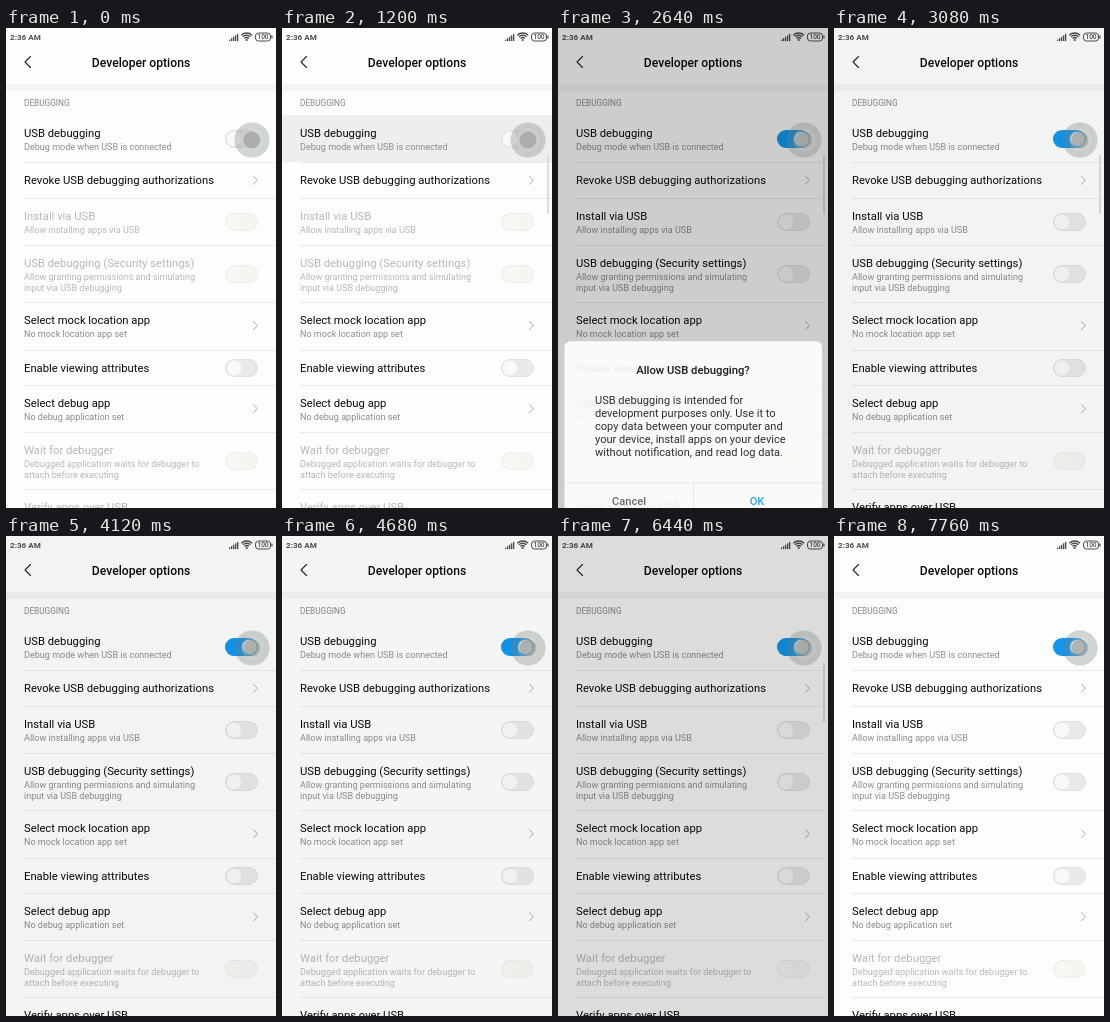
Recreate the animation shown at these times as an HTML page with a canvas. Size 270x480 px, loop 8.96 s.

```html
<!DOCTYPE html>
<html lang="en">
<head>
<meta charset="utf-8">
<title>Developer options</title>
<style>
  html, body { margin: 0; width: 100%; height: 100%; overflow: hidden; background: #fcfefb; }
  canvas { display: block; width: 270px; height: 480px; }
</style>
</head>
<body>
<canvas id="stage"></canvas>
<script>
const W = 270, H = 480, LOOP = 8960;
const canvas = document.getElementById('stage');
const scale = window.devicePixelRatio || 1;
canvas.width = W * scale;
canvas.height = H * scale;
const c = canvas.getContext('2d');

const PAGE = '#fcfefb', BLUE = '#0d98f2', INK = '#080a08';

const rows = [
  { y: 87, title: 'USB debugging', sub: ['Debug mode when USB is connected'], end: 'main' },
  { y: 134, title: 'Revoke USB debugging authorizations', end: 'chevron' },
  { y: 170, title: 'Install via USB', sub: ['Allow installing apps via USB'], end: 'toggle', needs: 'usb' },
  { y: 217, title: 'USB debugging (Security settings)',
    sub: ['Allow granting permissions and simulating', 'input via USB debugging'], end: 'toggle', needs: 'usb' },
  { y: 274, title: 'Select mock location app', sub: ['No mock location app set'], end: 'chevron' },
  { y: 321.5, title: 'Enable viewing attributes', end: 'toggle' },
  { y: 357, title: 'Select debug app', sub: ['No debug application set'], end: 'chevron' },
  { y: 404, title: 'Wait for debugger',
    sub: ['Debugged application waits for debugger to', 'attach before executing'], end: 'toggle', needs: 'app' },
  { y: 461, title: 'Verify apps over USB', needs: 'usb' }
];

const usbDialog = {
  top: 295, first: 353.5, step: 13, open: 1340, press: 2320, close: 2578, dim: 0.24,
  lines: ['USB debugging is intended for', 'development purposes only. Use it to',
    'copy data between your computer and', 'your device, install apps on your device',
    'without notification, and read log data.']
};
const keyDialog = {
  top: 303, first: 360.5, step: 12.8, open: 5420, press: 6120, close: 6240, dim: 0.3, check: 5840,
  lines: ["The computer's RSA key fingerprint is:", '99:D1:57:C7:31:4D:7D:5F:DC:', '6D:B4:EF:C6:48:F6:0F']
};

const clamp = x => Math.max(0, Math.min(1, x));
const span = (t, from, length) => clamp((t - from) / length);
const between = (t, a, b) => t >= a && t < b;

function text(s, x, y, size, color, weight = 400, align = 'left') {
  c.font = `${weight} ${size}px Roboto, sans-serif`;
  c.fillStyle = color;
  c.textAlign = align;
  c.textBaseline = 'alphabetic';
  c.fillText(s, x, y + size * 0.355);
}

function rect(x, y, w, h, color) {
  c.fillStyle = color;
  c.fillRect(x, y, w, h);
}

function pill(x, y, w, h, r) {
  c.beginPath();
  c.moveTo(x + r, y);
  c.arcTo(x + w, y, x + w, y + h, r);
  c.arcTo(x + w, y + h, x, y + h, r);
  c.arcTo(x, y + h, x, y, r);
  c.arcTo(x, y, x + w, y, r);
  c.closePath();
}

function disc(x, y, r, color) {
  c.beginPath();
  c.arc(x, y, r, 0, 7);
  c.fillStyle = color;
  c.fill();
}

function line(points, color, width) {
  c.beginPath();
  points.forEach(([x, y]) => c.lineTo(x, y));
  c.strokeStyle = color;
  c.lineWidth = width;
  c.lineCap = c.lineJoin = 'round';
  c.stroke();
}

function toggle(y, on, enabled) {
  c.save();
  if (!enabled) c.globalAlpha = 0.45;
  pill(219.5, y - 8.5, 32, 17, 8.5);
  c.fillStyle = '#e8eae7';
  c.fill();
  c.strokeStyle = '#dfe1de';
  c.lineWidth = 1;
  c.stroke();
  if (on > 0) {
    c.globalAlpha *= on;
    pill(219, y - 9, 33, 18, 9);
    c.fillStyle = BLUE;
    c.fill();
    c.globalAlpha = 1;
  }
  disc(228 + 15.5 * on, y, 7.3, '#f8faf7');
  c.restore();
}

function statusBar(color) {
  text('2:36 AM', 4, 9.3, 8.1, color, 700);
  for (let i = 0; i < 5; i++) rect(223 + i * 2, 11.5 - i * 1.4, 1.3, 1.6 + i * 1.4, color);
  c.strokeStyle = color;
  c.lineWidth = 1.4;
  c.lineCap = 'butt';
  for (const r of [3, 5.3, 7.6]) {
    c.beginPath();
    c.arc(240.7, 12.6, r, -Math.PI * 0.75, -Math.PI * 0.25);
    c.stroke();
  }
  disc(240.7, 12, 1.1, color);
  pill(249.5, 5, 15, 8, 3);
  c.lineWidth = 1;
  c.stroke();
  rect(265.3, 7.5, 1.2, 3, color);
  text('100', 257, 9.1, 6.6, color, 500, 'center');
}

function page(t) {
  const on = span(t, 2480, 110);
  const available = { usb: on > 0, app: false };
  rect(0, 0, W, H, PAGE);
  line([[24.5, 28.5], [19, 34], [24.5, 39.5]], '#222422', 1.1);
  text('Developer options', 135, 34.3, 12.15, INK, 500, 'center');
  rect(0, 56, W, 7, '#f3f5f2');
  text('DEBUGGING', 18, 75.5, 8.25, '#858784');
  if (t >= 1120 && t < 1400) rect(0, 87, W, 47, `rgba(0,0,0,${0.06 * span(t, 1080, 120)})`);

  for (const row of rows) {
    const enabled = !row.needs || available[row.needs];
    const lines = row.sub || [];
    if (row.y > 87) rect(18, Math.round(row.y), 252, 1, '#eaece9');
    text(row.title, 18, row.y + 18.3, 11.25, enabled ? INK : '#b7b9b6');
    lines.forEach((s, i) => text(s, 18, row.y + 31.7 + i * 10.7, 9.05, enabled ? '#8b8d8a' : '#b7b9b6'));
    const mid = row.y + (lines.length ? 18.5 + lines.length * 5.2 : 18.3);
    if (row.end === 'main') toggle(111, on, true);
    if (row.end === 'toggle') toggle(Math.round(mid), 0, enabled);
    if (row.end === 'chevron') line([[247.5, mid - 4], [251.3, mid], [247.5, mid + 4]], '#abadaa', 1);
  }
  if (between(t, 1120, 3480) || between(t, 5480, 7760)) rect(265, 127, 2, 59, '#dcdedb');
}

// Shade falls quickly once a dialog leaves; the first leaves a faint trace.
function shade(t) {
  const level = d => d.dim * (t < d.close
    ? Math.sqrt(span(t, d.open, 200))
    : Math.pow(1 - span(t, d.close, 760), 2.7));
  const trace = t > usbDialog.close ? 0.04 * (1 - span(t, 4480, 880)) : 0;
  return Math.max(level(usbDialog), level(keyDialog), trace);
}

function checkbox(x, y, on) {
  c.beginPath();
  c.arc(x, y, 7, 0, 7);
  c.strokeStyle = '#c6c8c5';
  c.lineWidth = 1;
  c.stroke();
  if (!on) return;
  c.save();
  c.globalAlpha *= on;
  disc(x, y, 7.6, BLUE);
  line([[x - 3.3, y + 0.2], [x - 0.9, y + 2.7], [x + 3.6, y - 2.5]], '#fff', 1.4);
  c.restore();
}

function dialog(d, t) {
  if (!between(t, d.open, d.close + 200)) return;
  const out = span(t, d.close, 200) ** 2;
  const rise = Math.pow(1 - span(t, d.open, 200), 4.3);
  const pressed = span(t, d.press - 40, 80) - span(t, d.press + 120, 80);
  c.save();
  c.translate(0, (H - d.top) * (rise + out));
  c.globalAlpha = 1 - out * 0.8;
  pill(6.5, d.top, 257.5, 473.5 - d.top, 6);
  c.fillStyle = '#fdfffc';
  c.fill();
  c.save();
  c.clip();
  rect(135.5, 436, 129, 38, `rgba(0,0,0,${0.06 * pressed})`);
  rect(6, 436, 259, 1, '#e3e5e2');
  rect(135, 436, 1, 38, '#e3e5e2');
  c.restore();
  text('Allow USB debugging?', 135, d.top + 29, 11.25, INK, 500, 'center');
  d.lines.forEach((s, i) => text(s, 37, d.first + i * d.step, 11.05, '#1b1d1b'));
  if (d.check) {
    checkbox(44, 414.3, span(t, d.check, 120));
    text('Always allow from this computer', 55, 414.8, 10.5, '#787a77');
  }
  text('Cancel', 71, 455.2, 11.1, '#5b5d5a', 500, 'center');
  text('OK', 199, 455.2, 11.1, '#1c9cea', 500, 'center');
  c.restore();
}

function floatingBall() {
  disc(246, 112, 17.6, 'rgba(120,124,120,0.32)');
  disc(246, 112, 11.3, 'rgba(255,255,255,0.12)');
  disc(246, 112, 8.6, 'rgba(140,143,140,0.5)');
}

function draw(t) {
  c.setTransform(scale, 0, 0, scale, 0, 0);
  const light = between(t, 5480, 6400);
  page(t);
  if (!light) statusBar('#4b4d4a');
  rect(0, 0, W, H, `rgba(0,0,0,${shade(t)})`);
  if (light) statusBar('#f6f8f5');
  floatingBall();
  dialog(usbDialog, t);
  dialog(keyDialog, t);
}

const start = performance.now();
function tick() {
  draw((performance.now() - start) % LOOP);
  requestAnimationFrame(tick);
}
tick();
</script>
</body>
</html>
```
